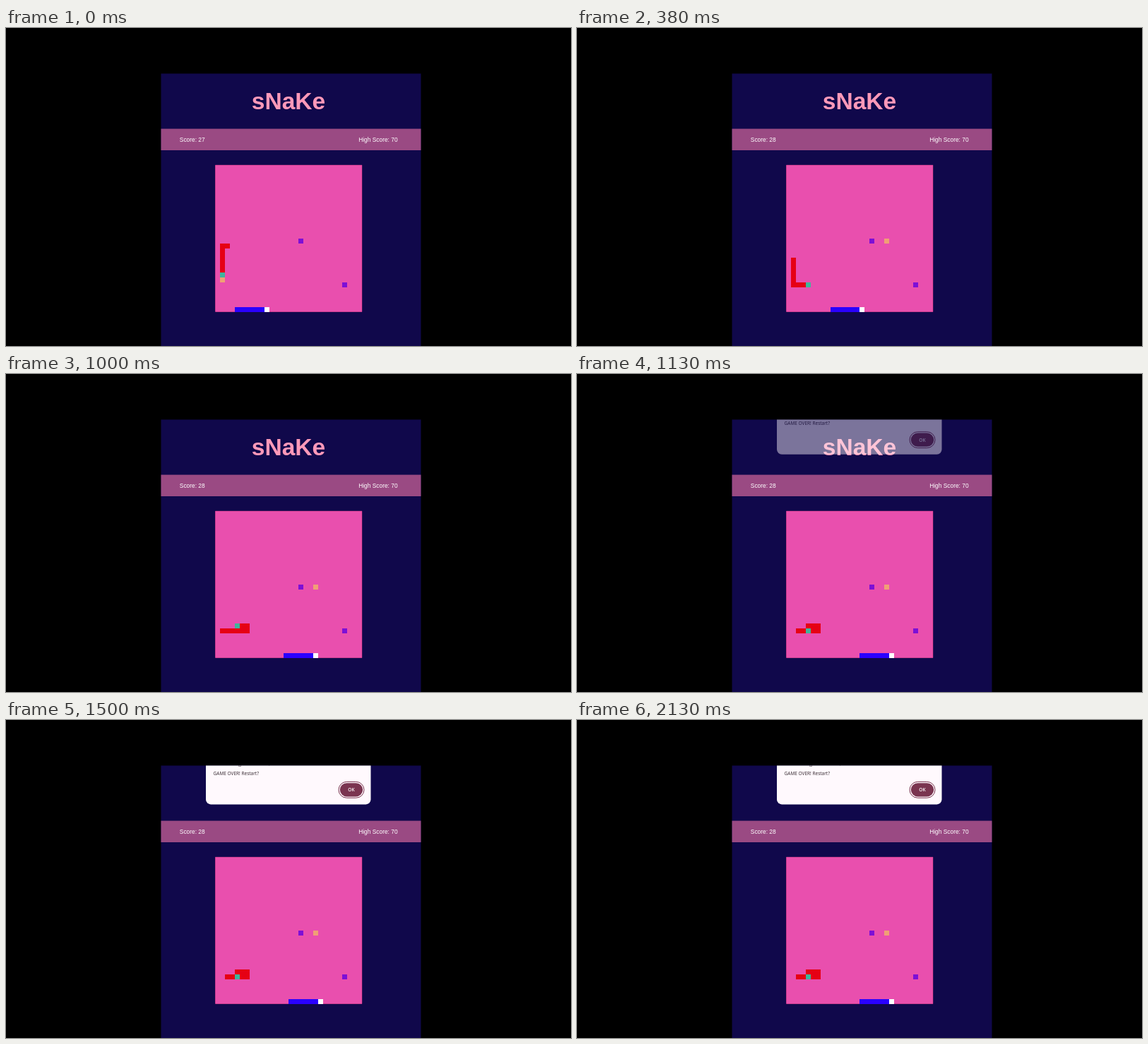
Recreate the animation shown at these times as an HTML page. Size 800x450 px, loop 2.26 s.

```html
<!DOCTYPE html>
<html lang="en">
<head>
<meta charset="utf-8">
<title>sNaKe</title>
<style>
  html, body { margin: 0; width: 100%; height: 100%; overflow: hidden; background: #000; }
  svg { display: block; width: 100%; height: 100%; }
  text { font-family: "Liberation Sans", Arial, sans-serif; }
  #dialog text { font-family: "Open Sans", "Noto Sans", sans-serif; font-size: 6.5px; fill: #33272e; }
  #dialog .ok { font-weight: 600; fill: #fff; text-anchor: middle; }
</style>
</head>
<body>
<svg viewBox="0 0 800 450">
  <clipPath id="page"><rect x="219.5" y="64.5" width="368" height="386"/></clipPath>
  <rect width="800" height="450"/>
  <g clip-path="url(#page)">
    <rect x="219" y="64" width="369" height="387" fill="#10084b"/>
    <text x="400" y="114.5" font-size="33.6" font-weight="bold" text-anchor="middle" fill="#ff99b9">sNaKe</text>
    <rect x="219" y="142.6" width="369" height="30.4" fill="#9a4a83"/>
    <g font-size="8.4" fill="#fff">
      <text id="score" x="245.8" y="160.5"></text>
      <text x="554.6" y="160.5" text-anchor="end">High Score: 70</text>
    </g>
    <rect x="296.4" y="193.9" width="207.7" height="207.7" fill="#e94fae"/>
    <rect x="296.7" y="194.2" width="207.1" height="207.1" fill="none" stroke="#ea4793" stroke-width=".6"/>
    <g id="cells" shape-rendering="crispEdges"></g>
    <g id="dialog">
      <rect x="283" y="20" width="233.5" height="99.4" rx="7" fill="#fff9fd"/>
      <text x="329" y="63.6" style="font-size:8px">g</text>
      <text x="372" y="63.6" style="font-size:8px">,</text>
      <text x="293.6" y="78">GAME OVER! Restart?</text>
      <rect x="471" y="87.4" width="36" height="22.8" rx="11.4" fill="none" stroke="#7a3550"/>
      <rect x="472.8" y="89.2" width="32.4" height="19.2" rx="9.6" fill="#7a3550"/>
      <text class="ok" x="489" y="101.2">OK</text>
    </g>
  </g>
</svg>
<script>
const LOOP = 2260, CELL = 6.917, LEFT = 296.5, TOP = 194;
const ticks = [130, 250, 380, 500, 630, 750, 880, 1000, 1130];
const slide = [[1130, -5.6, .45], [1250, -2, .97], [1380, -.4, 1], [1500, 0, 1]]; // time, offset, opacity
const $ = id => document.getElementById(id);

// Route of the red snake, built from straight runs: dx, dy, length
const route = [[2, 16]];
for (const [dx, dy, n] of [[-1, 0, 1], [0, 1, 8], [1, 0, 5], [0, -1, 1], [-1, 0, 2], [0, 1, 1]])
  for (let i = 0; i < n; i++) {
    const [x, y] = route[route.length - 1];
    route.push([x + dx, y + dy]);
  }

const block = (x, y, fill, w = 1) =>
  `<rect x="${LEFT + x * CELL}" y="${TOP + y * CELL}" width="${w * CELL}" height="${CELL}" fill="${fill}"/>`;

function render(t) {
  const passed = ticks.filter(at => t >= at).length;
  const moves = passed ? passed + 2 : 0; // the first tick catches up three moves
  const head = 7 + moves, tail = Math.max(0, moves - 1);
  const food = moves ? [20, 15] : [1, 23];

  $("score").textContent = "Score: " + (moves ? 28 : 27);
  $("cells").innerHTML =
    block(17, 15, "#7d10d6") + block(26, 24, "#7d10d6") + block(...food, "#f0a075") +
    route.slice(tail, head).map(p => block(...p, "#e60014")).join("") +
    block(...route[head], "#3fb59c") +
    block(4 + moves, 29, "#2a00ff", 6) + block(10 + moves, 29, "#fff");

  const pose = slide.filter(([at]) => t >= at).pop();
  const [, offset, opacity] = pose || [0, 0, 0];
  $("dialog").setAttribute("transform", `translate(0 ${offset})`);
  $("dialog").setAttribute("opacity", opacity);
}

const start = performance.now();
function loop() {
  render((performance.now() - start) % LOOP);
  requestAnimationFrame(loop);
}
loop();
</script>
</body>
</html>
```
